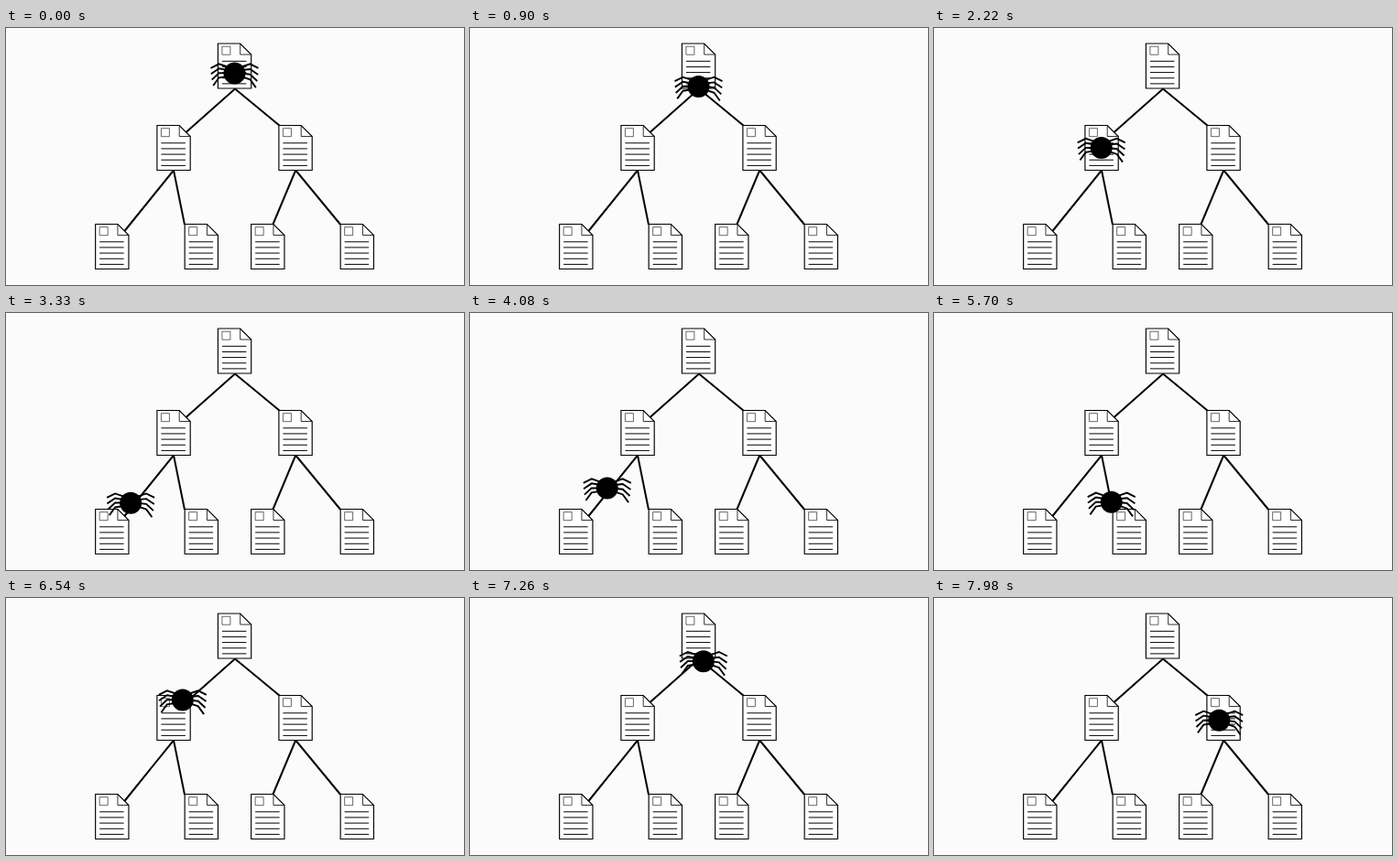
Animation of 500x281 px, one loop 8000 ms. Source, as an HTML page:

```html
<!DOCTYPE html>
<html lang="en">
<head>
<meta charset="utf-8">
<title>Crawler on a page tree</title>
<style>
  html, body { margin: 0; width: 100%; height: 100%; overflow: hidden; background: #fbfbfb; }
  svg { display: block; width: 100%; height: 100%; fill: none; stroke: #000; }
  .edges { stroke-width: 2; }
  .sheet { fill: #fff; stroke-width: 1.15; }
  .fold { stroke-width: .8; }
  .icon { stroke-width: .6; }
  .legs { stroke-width: 1.9; }
  .body { fill: #000; stroke: none; }
</style>
</head>
<body>
<svg viewBox="0 0 500 281">
  <defs>
    <g id="page">
      <path class="sheet" d="M0 0H24.300L36.300 12V49H0Z"/>
      <path class="fold" d="M24.300 0V12H36.300"/>
      <path class="icon" d="M4.500 3.200h9v9h-9z"/>
      <path id="rows"/>
    </g>
  </defs>
  <path class="edges" d="M196 114.500L250 66.500L299 107M129 222.500L183 155.500L195 215M291.300 215L316.200 155.500L365.200 215"/>
  <g id="pages"></g>
  <g id="spider">
    <path class="legs" id="legs"/>
    <circle class="body" r="12"/>
  </g>
</svg>
<script>
  const $ = id => document.getElementById(id);
  const range = n => [...Array(n).keys()];

  $('rows').setAttribute('d', range(5).map(i => `M4.500 ${19.3 + i * 6.15}h26.500`).join(''));

  // The tree is mirrored about its root: distance from the axis, then height.
  const AXIS = 231.4;
  const levels = [[0, 17], [66.5, 106.5], [133.75, 214.5], [36.25, 214.5]];
  $('pages').innerHTML = levels.flatMap(([gap, y]) => (gap ? [-gap, gap] : [0])
    .map(dx => `<use href="#page" x="${AXIS + dx}" y="${y}"/>`)).join('');

  function leg(side, i) {
    const lean = side > 0 ? i * 0.7 : 0;
    const tip = [side * (26 - 0.3 * i * i), -5.7 + 6.4 * i + lean];
    const knee = [side * 17, -10.2 + 5 * i + lean];
    const hip = [side * 6, -6.5 + 3.2 * i];
    return `M${tip}L${knee}L${hip}`;
  }
  $('legs').setAttribute('d', [-1, 1].flatMap(side => range(4).map(i => leg(side, i))).join(''));

  const place = {
    start: [249.5, 49.5], rootFoot: [249.5, 64.7],
    midTop: [191, 113], midBody: [182.7, 131], midFoot: [183.3, 151.8],
    leafOne: [114.5, 233.3], leafTwoTop: [194.5, 211], leafTwo: [214.5, 235.3],
    rightTop: [303, 110], rightBody: [312, 136]
  };
  // Arrival time in ms at each stop of the walk.
  const walk = [
    [0, 'start'], [950, 'rootFoot'], [1790, 'midTop'], [2220, 'midBody'], [2690, 'midFoot'],
    [3625, 'leafOne'], [4515, 'midFoot'], [5110, 'leafTwoTop'], [5385, 'leafTwo'],
    [5665, 'leafTwoTop'], [6175, 'midFoot'], [6520, 'midTop'], [7205, 'rootFoot'],
    [7770, 'rightTop'], [8000, 'rightBody']
  ];
  const DURATION = walk.at(-1)[0];

  function spiderAt(time) {
    const next = walk.findIndex(([arrival]) => arrival > time);
    const [t0, from] = walk[next - 1];
    const [t1, to] = walk[next];
    const k = (time - t0) / (t1 - t0);
    return place[from].map((v, axis) => v + (place[to][axis] - v) * k);
  }

  const begin = performance.now();
  function draw(now) {
    const time = Math.max(0, now - begin) % DURATION;
    $('spider').setAttribute('transform', `translate(${spiderAt(time)})`);
    requestAnimationFrame(draw);
  }
  draw(begin);
</script>
</body>
</html>
```
